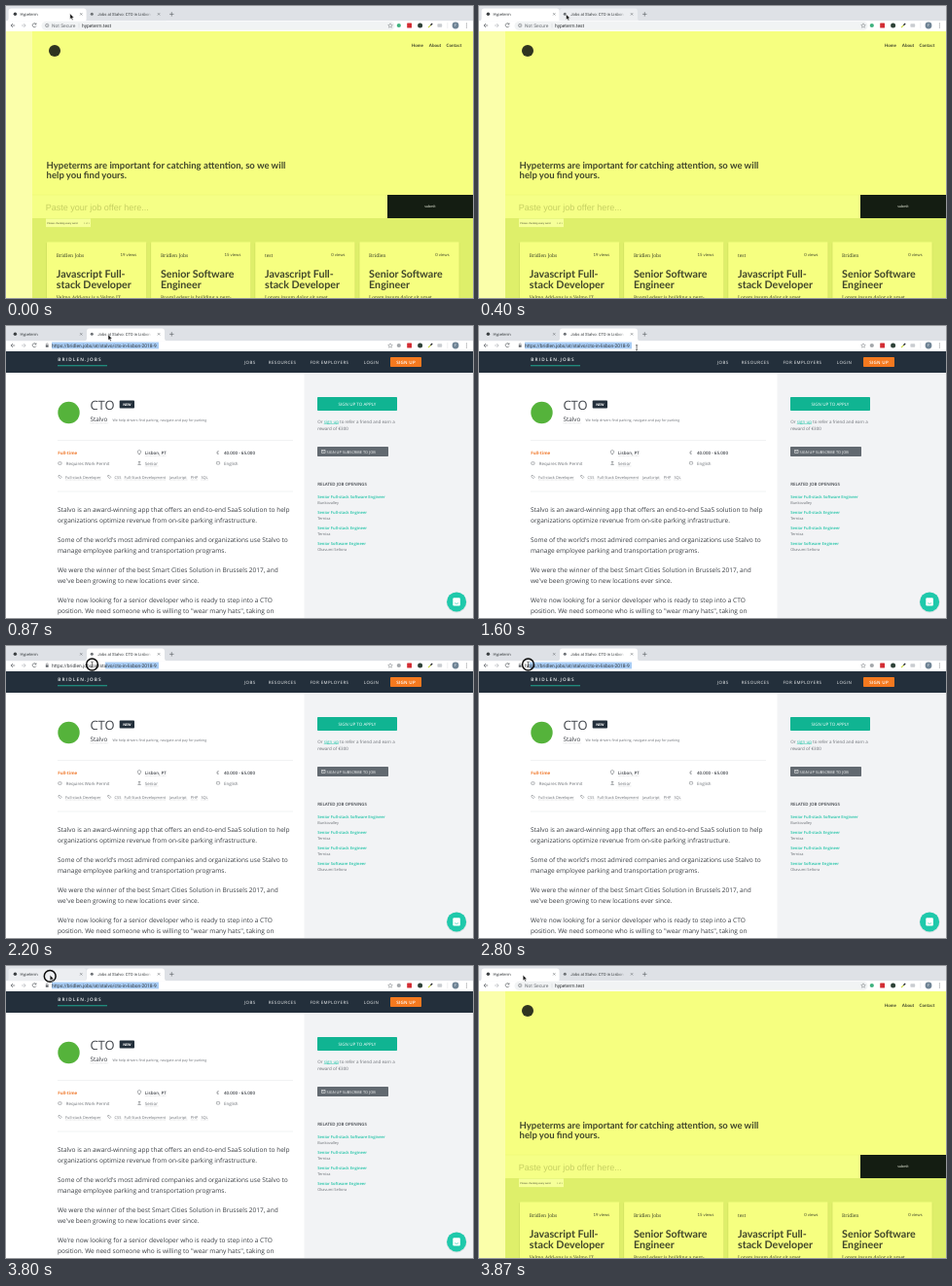
An HTML page that plays this animation: 480 by 300 pixels, repeating every 3990 ms.

```html
<!DOCTYPE html>
<html lang="en">
<head>
<meta charset="utf-8">
<title>Browser tabs</title>
<style>
  html, body { margin: 0; width: 100%; height: 100%; overflow: hidden; background: #fff; }
  svg { display: block; width: 100vw; height: 100vh; }
  text { text-rendering: geometricPrecision; white-space: pre; }
  .ui { font-family: Roboto, sans-serif; }
  .lato { font-family: Lato, sans-serif; }
  .serif { font-family: "Noto Serif", serif; }
  .arial { font-family: "Liberation Sans", sans-serif; }
  .open { font-family: "Open Sans", sans-serif; }
</style>
</head>
<body>
<svg id="stage" viewBox="0 0 480 300" preserveAspectRatio="none" xmlns="http://www.w3.org/2000/svg">
  <defs>
    <linearGradient id="fadeOn"><stop offset="0" stop-color="#fff" stop-opacity="0"/><stop offset="1" stop-color="#fff"/></linearGradient>
    <linearGradient id="fadeOff"><stop offset="0" stop-color="#dee1e6" stop-opacity="0"/><stop offset="1" stop-color="#dee1e6"/></linearGradient>
    <linearGradient id="fadeHover"><stop offset="0" stop-color="#eceef1" stop-opacity="0"/><stop offset="1" stop-color="#eceef1"/></linearGradient>
  </defs>
  <g id="home"></g>
  <g id="job"></g>
  <g id="chrome"></g>
  <g id="cursor">
    <circle id="ring" r="5.9" fill="none" stroke="#0b0b0b" stroke-width="1.5"/>
    <path id="arrow" d="M0 -1.2V4.5L1.3 3.4L2.2 5.4L3.2 5L2.3 3H4.1Z" fill="#111" stroke="#fff" stroke-width=".45"/>
    <path id="beam" d="M-1.1 -2.8Q0 -2.8 0 -2V2Q0 2.8 -1.1 2.8M1.1 -2.8Q0 -2.8 0 -2M0 2Q0 2.8 1.1 2.8" fill="none" stroke="#222" stroke-width=".6"/>
  </g>
</svg>
<script>
const $ = id => document.getElementById(id);

const rect = (x, y, w, h, fill, extra = "") =>
  `<rect x="${x}" y="${y}" width="${w}" height="${h}" fill="${fill}" ${extra}/>`;
const dot = (x, y, r, fill) => `<circle cx="${x}" cy="${y}" r="${r}" fill="${fill}"/>`;
const path = (d, stroke, width = .7, extra = "") =>
  `<path d="${d}" fill="none" stroke="${stroke}" stroke-width="${width}" ${extra}/>`;
const text = (font, x, y, size, fill, str, extra = "") =>
  `<text class="${font}" x="${x}" y="${y}" font-size="${size}" fill="${fill}" ${extra}>${str}</text>`;

const MEDIUM = 'font-weight="500"', SEMI = 'font-weight="600"', BOLD = 'font-weight="700"';
const END = 'text-anchor="end"', MID = 'text-anchor="middle"';

function buildHome() {
  const ink = "#41462a", page = "#f6ff80";
  const card = (i, company, views, lines, blurb) => {
    const x = 42 + i * 107.1;
    return rect(x - .5, 243, 103.4, 60, "#c3d457", 'rx="1" opacity=".75"') +
      rect(x, 242.6, 102.4, 60, page, 'rx=".8"') +
      text("serif", x + 9.8, 257.7, 4.9, ink, company) +
      text("lato", x + 92.2, 257.2, 4.3, ink, views + " views", END) +
      lines.map((s, n) => text("lato", x + 9.8, 279 + n * 10.8, 10.7, ink, s, BOLD)).join("") +
      text("serif", x + 9.8, 301, 4.9, ink, blurb);
  };
  const dev = ["Javascript Full-", "stack Developer"], eng = ["Senior Software", "Engineer"];
  return rect(0, 26, 480, 274, page) +
    rect(27, 218, 453, 82, "#deef6a") +
    rect(0, 26, 27, 274, "#fbffaa") +
    dot(50, 46, 6, "#2f3420") +
    text("lato", 416.8, 42.2, 4.5, ink, "Home", BOLD) +
    text("lato", 434.8, 42.2, 4.5, ink, "About", BOLD) +
    text("lato", 452.6, 42.2, 4.5, ink, "Contact", BOLD) +
    text("lato", 41.6, 167.4, 9.5, ink, "Hypeterms are important for catching attention, so we will", BOLD) +
    text("lato", 41.6, 176.9, 9.5, ink, "help you find yours.", BOLD) +
    rect(27, 194, 365, 24, "#f5ff86") +
    path("M27 194H392", "#eaf471", .5) +
    text("arial", 40.8, 209.6, 9, "#c5cf62", "Paste your job offer here...") +
    rect(392, 194, 88, 24, "#141d12") +
    text("lato", 436, 207.4, 3.8, "#e9eddc", "submit", MID) +
    rect(41, 218.5, 46, 8.6, "#f6ff9a") +
    text("arial", 42.3, 223.8, 2.5, "#4a4f30", "Please checking every word.") +
    text("arial", 80, 223.8, 2.3, "#7b8244", "1 of 1") +
    card(0, "Bridlen Jobs", 19, dev, "Velmo Add-ons is a Velmo IT") +
    card(1, "Bridlen Jobs", 15, eng, "RoamLedger is building a next-") +
    card(2, "test", 0, dev, "Lorem ipsum dolor sit amet,") +
    card(3, "Bridlen", 0, eng, "Lorem ipsum dolor sit amet,");
}

function buildJob() {
  const ink = "#42464c", soft = "#6b6f75", teal = "#1fc3a6", navy = "#232f3b";
  const t = (...a) => text("open", ...a);
  const under = (x, y, w) => path(`M${x} ${y}h${w}`, "#9a9da2", .35, 'stroke-dasharray=".8 .5"');
  const nav = [[245, "JOBS"], [269.8, "RESOURCES"], [312.4, "FOR EMPLOYERS"], [367.8, "LOGIN"]];
  const tags = [[61, "Full-stack Developer", 37], [111.6, "CSS", 7], [121.6, "Full-Stack Development", 43],
    [168, "JavaScript", 18.5], [189.8, "PHP", 7.5], [200.4, "SQL", 7.5]];
  const body = [
    "Stalvo is an award-winning app that offers an end-to-end SaaS solution to help",
    "organizations optimize revenue from on-site parking infrastructure.",
    "Some of the world's most admired companies and organizations use Stalvo to",
    "manage employee parking and transportation programs.",
    "We were the winner of the best Smart Cities Solution in Brussels 2017, and",
    "we've been growing to new locations ever since.",
    "We're now looking for a senior developer who is ready to step into a CTO",
    "position. We need someone who is willing to \"wear many hats\", taking on"];
  const related = [["Senior Full-stack Software Engineer", "Bunkovalley"], ["Senior Full-stack Engineer", "Ternixa"],
    ["Senior Full-stack Engineer", "Ternixa"], ["Senior Software Engineer", "Okavumi Seltora"]];
  const icon = (x, y) => rect(x - 1.6, y - 1.2, 3.2, 2.5, "none", `stroke="${soft}" stroke-width=".5" rx=".4"`);
  const tag = (x, y) => path(`M${x - 1.5} ${y - 1.5}h1.4l1.8 1.8l-1.4 1.4l-1.8 -1.8z`, soft, .5);

  return rect(0, 26, 480, 274, "#fff") +
    rect(306.5, 48, 173.5, 252, "#f2f3f5") +
    rect(0, 26, 480, 22, navy) +
    t(53.2, 35.9, 4.7, "#f2f4f5", "BRIDLEN.JOBS", SEMI + ' letter-spacing="1.15"') +
    rect(53, 40.4, 51, .8, teal) +
    nav.map(([x, s]) => t(x, 38.8, 4.45, "#f2f4f5", s, MEDIUM + ' letter-spacing=".42"')).join("") +
    rect(395, 32, 32, 10, "#f5791f", 'rx=".8"') +
    t(411.1, 38.6, 4.5, "#fff", "SIGN UP", SEMI + ' letter-spacing=".25" ' + MID) +

    dot(64.5, 89, 11.2, "#55b33b") +
    t(86.4, 86.2, 12.9, ink, "CTO") +
    rect(116.7, 76.6, 15.3, 8, navy, 'rx=".8"') +
    t(124.4, 81.9, 3.6, "#fff", "NEW", BOLD + " " + MID) +
    t(86.6, 97.8, 6.3, "#34383e", "Stalvo", MEDIUM) +
    under(86.6, 99.8, 18.5) +
    t(109.5, 97.8, 3.6, soft, "We help drivers find parking, navigate and pay for parking") +
    path("M53 117.5H295M53 170H295", "#e3e5e7", .5) +

    t(53.2, 131.8, 4.5, "#f0792c", "Full-time", BOLD) +
    path("M137 132.2C134 128.6 135.6 127.7 137 127.7S140 128.6 137 132.2", soft, .6) +
    t(142.8, 131.8, 4.5, ink, "Lisbon, PT", SEMI) + under(142.8, 133.3, 22) +
    t(216.2, 132, 5, soft, "€") +
    t(224, 131.8, 4.5, ink, "40.000 - 65.000", SEMI) +
    icon(55.4, 141) + t(61.8, 142.5, 4.4, soft, "Requires Work Permit") +
    path("M135.4 142.4h3.4M137 142.4v-3M135.8 139.6h2.5", soft, .6) +
    t(142.8, 142.5, 4.4, soft, "Senior") + under(142.8, 144, 13.5) +
    icon(218, 140.8) + t(224, 142.5, 4.4, soft, "English") +
    tag(55.5, 155) + tag(106.2, 155) +
    tags.map(([x, s, w]) => t(x, 156.5, 3.9, soft, s) + under(x, 158, w)).join("") +
    body.map((s, i) => t(53, 191.4 + (i >> 1) * 30.8 + (i % 2) * 10.8, 6.55, "#3a3e43", s, MEDIUM)).join("") +

    rect(320, 73, 82, 14, "#10b492", 'rx=".8"') +
    t(361, 81.6, 4.5, "#fff", "SIGN UP TO APPLY", MEDIUM + " " + MID) +
    t(320.2, 99.5, 4.5, soft, `Or <tspan fill="${teal}" text-decoration="underline">sign up</tspan> to refer a friend and earn a`) +
    t(320.2, 106.6, 4.5, soft, "reward of €300") +
    rect(320, 124, 73, 10, "#626970", 'rx=".8"') +
    path("M324.5 127.5h3.6v3h-3.6zl1.8 1.5l1.8 -1.5", "#fff", .5) +
    t(329.6, 130.5, 3.9, "#fff", "SIGN UP SUBSCRIBE TO JOB", MEDIUM) +
    t(320.2, 163.9, 4.4, ink, "RELATED JOB OPENINGS", SEMI) +
    related.map(([role, firm], i) => t(320.2, 176.6 + i * 16, 4.1, teal, role, SEMI) +
      t(320.2, 183.1 + i * 16, 3.9, soft, firm)).join("") +

    dot(463.1, 284, 10.5, "#dfe2e4") + dot(463.1, 283.4, 10, "#1fc9ab") +
    rect(459.3, 279.2, 7.6, 8.2, "#fff", 'rx="1.2"') +
    path("M461.1 284.7Q463.1 286.1 465.1 284.7", "#1fc9ab", .6);
}

function buildChrome() {
  const tabShape = x => `M${x - 3} 15.5Q${x} 15.5 ${x} 12.5V5.5Q${x} 2.6 ${x + 3} 2.6H${x + 77}Q${x + 80} 2.6 ${x + 80} 5.5V12.5Q${x + 80} 15.5 ${x + 83} 15.5Z`;
  const cross = x => path(`M${x - 1.1} 7.2l2.3 2.3m0 -2.3l-2.3 2.3`, "#5f6368", .55);
  const u = (...a) => text("ui", ...a);
  return rect(0, 0, 480, 15.5, "#dee1e6") +
    `<path id="tab0" d="${tabShape(2.6)}"/><path id="tab1" d="${tabShape(83)}"/>` +
    dot(9.4, 8.3, 1.7, "#3c4043") + u(14.4, 9.9, 4.2, "#3c4043", "Hypeterm") + cross(77.2) +
    dot(88.3, 8.3, 1.5, "#6d7175") + u(94.2, 9.9, 4.2, "#3c4043", "Jobs at Stalvo: CTO in Lisbon") +
    rect(142, 5, 9, 7, "none", 'id="fade"') + '<rect id="fadeEnd" x="151" y="5" width="4" height="7"/>' + cross(157) +
    path("M170.3 6.2v4.4M168.1 8.4h4.4", "#5f6368", .65) +
    rect(0, 15.3, 480, 10.7, "#fff") +
    path("M9.2 20H5M7 18L5 20L7 22", "#5f6368", .7) +
    path("M16 20H20.2M18.2 18L20.2 20L18.2 22", "#b5b8bc", .7) +
    path("M30.8 18.6A2 2 0 1 0 31 20.6M31 17.4V18.9H29.4", "#5f6368", .7) +
    rect(36.5, 15.9, 363, 8.8, "#f1f3f4", 'id="omni" rx="4.4"') +
    '<g id="urlHome">' +
      '<circle cx="42.2" cy="20" r="1.7" fill="none" stroke="#5f6368" stroke-width=".5"/>' +
      path("M42.2 19.7v1.2M42.2 18.8v.4", "#5f6368", .5) +
      u(47, 21.8, 4.95, "#6a6e73", "Not Secure") + path("M75 17.8v4.6", "#c4c7ca", .4) +
      u(78, 21.8, 4.9, "#2a2d30", "hypeterm.test") +
    '</g><g id="urlJob">' +
      rect(40.8, 19.4, 2.8, 2.4, "#5f6368", 'rx=".3"') + path("M41.3 19.5V18.7A.9 .9 0 0 1 43.1 18.7V19.5", "#5f6368", .5) +
      rect(47, 16.6, 110, 6.8, "#a9cdf5", 'id="sel"') +
      u(47, 21.8, 4.9, "#303438", "https://bridlen.jobs/at/stalvo/cto-in-lisbon-2018-9") +
    '</g>' +
    path("M395 17.8l.7 1.5l1.6 .2l-1.2 1.1l.3 1.6l-1.4 -.8l-1.4 .8l.3 -1.6l-1.2 -1.1l1.6 -.2z", "#6c7075", .45) +
    '<circle id="ext" cx="403.8" cy="20" r="2.1"/>' +
    rect(412.2, 17.6, 4.8, 4.8, "#d22c33", 'rx=".5"') +
    dot(425.6, 20, 2.5, "#2f4238") +
    path("M434 22.2l2.6 -2.6", "#c8d640", 1.2) + path("M436.4 19.8l1.8 -1.8", "#25282b", 1.3) +
    rect(443.4, 18.2, 4.8, 3.6, "#c9ccd0", 'rx=".7"') +
    path("M453.8 17v6", "#d5d8db", .4) +
    dot(462, 20, 3.4, "#6f8495") + u(462, 21.2, 3.4, "#fff", "F", MID) +
    [18, 20, 22].map(y => dot(473.3, y, .5, "#5f6368")).join("");
}

$("home").innerHTML = buildHome();
$("job").innerHTML = buildJob();
$("chrome").innerHTML = buildChrome();

const LOOP = 3990, STEP = 200 / 3, LAST = 58;
const URL_LEFT = 47, URL_RIGHT = 157;

// Pointer hot spot: time, x, y
const route = [
  [0, 65.8, 9], [70, 65.8, 9], [600, 104, 10], [733, 105, 10], [1000, 105, 10], [1200, 100, 15],
  [1530, 160, 19], [1730, 166, 28.5], [1900, 166, 28.5], [2133, 102, 19.5], [2200, 88.5, 19],
  [2400, 63, 15.5], [2600, 54, 18], [2800, 50.5, 19], [2930, 47.5, 19], [3000, 47.5, 19],
  [3470, 42.5, 20.5], [3530, 42.5, 20], [3733, 45.2, 10.4], [3990, 45.2, 10.4]];

function pointerAt(t) {
  const i = Math.max(1, route.findIndex(k => k[0] >= t));
  const [t0, x0, y0] = route[i - 1], [t1, x1, y1] = route[i];
  const p = (t - t0) / (t1 - t0);
  return [x0 + (x1 - x0) * p, y0 + (y1 - y0) * p];
}

const within = (t, a, b) => t >= a && t < b;
const show = (id, on) => $(id).setAttribute("visibility", on ? "visible" : "hidden");
const paint = (id, fill) => $(id).setAttribute("fill", fill);

function selectionStart(t) {
  if (t < 1650 || t >= 2930) return URL_LEFT;
  if (t < 1930) return URL_RIGHT;
  // The highlight trails the pointer by one step
  const x = pointerAt(t - STEP)[0];
  return Math.min(URL_RIGHT, Math.max(URL_LEFT, x));
}

function draw(ms) {
  const t = Math.min(LAST, Math.floor((ms + 4) / STEP)) * STEP + .01;
  const onJob = within(t, 860, 3860);
  const dragging = within(t, 1660, 2930);
  const [x, y] = pointerAt(t);

  show("home", !onJob);
  show("job", onJob);
  show("urlHome", !onJob);
  show("urlJob", onJob);
  paint("omni", onJob ? "#fff" : "#f1f3f4");
  paint("ext", onJob ? "#a3a7ab" : "#3fb27f");

  const active = onJob ? 1 : 0;
  const hovered = y < 15.5 ? (x < 83 ? 0 : 1) : -1;
  const tone = i => i === active ? "On" : i === hovered ? "Hover" : "Off";
  const fills = { On: "#fff", Hover: "#eceef1", Off: "#dee1e6" };
  paint("tab0", fills[tone(0)]);
  paint("tab1", fills[tone(1)]);
  paint("fade", `url(#fade${tone(1)})`);
  paint("fadeEnd", fills[tone(1)]);

  const start = selectionStart(t);
  $("sel").setAttribute("x", start);
  $("sel").setAttribute("width", URL_RIGHT - start);

  const beam = dragging || (y > 15.5 && y < 26 && x > 46);
  $("cursor").setAttribute("transform", `translate(${x} ${y})`);
  show("ring", dragging || within(t, 730, 860) || within(t, 3730, 3860));
  show("beam", beam);
  show("arrow", !beam);
}

const begin = performance.now();
function tick() {
  draw((performance.now() - begin) % LOOP);
  requestAnimationFrame(tick);
}
tick();
</script>
</body>
</html>
```
